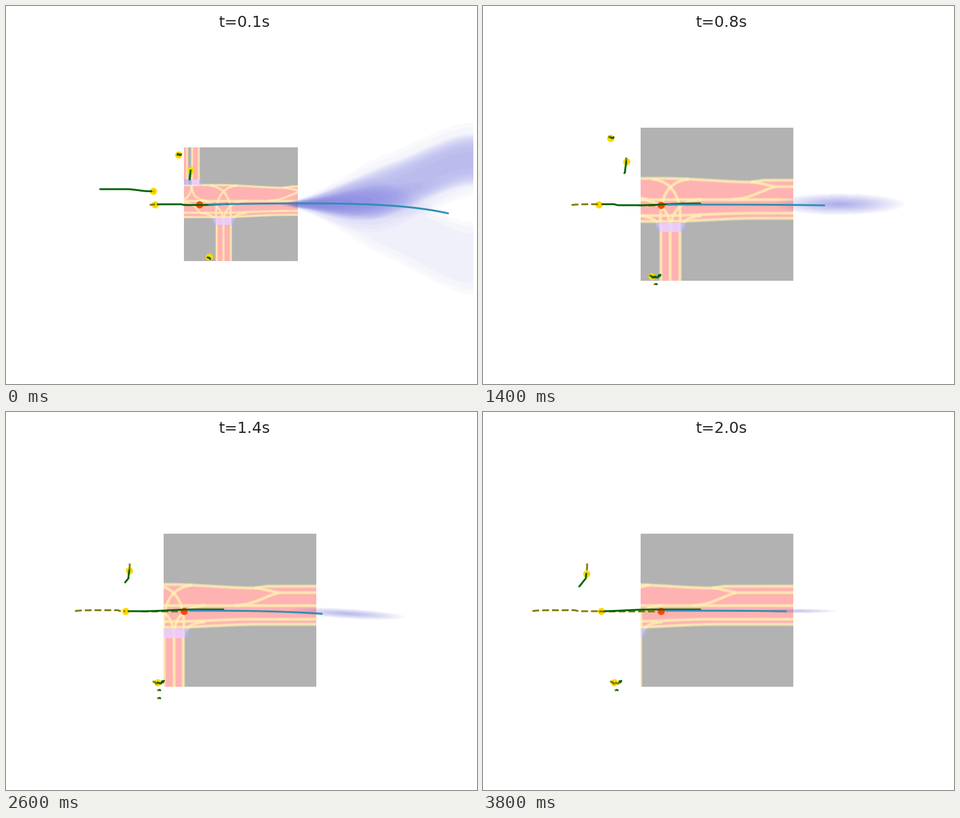
Animation of 765x615 px, one loop 4000 ms. Source, as a matplotlib script:

```python
import numpy as np
import matplotlib.pyplot as plt
from matplotlib.animation import FuncAnimation
from matplotlib.patches import Polygon, Rectangle

W, H, PT = 765, 615, 0.72
FRAMES, SPEED = 20, 5.3          # scroll in px per frame
CX, CY, EGO = 387, 322.5, (288.5, 323)
GREY, PINK, YELLOW = "#b2b2b2", "#ffb2b2", "#fff3b2"
BLUE, PALE = "#b4b2ff", "#ffd8ff"
STEP = 0.025                     # density contour step

plt.rcParams["font.family"] = "DejaVu Sans"
fig = plt.figure(figsize=(W / 100, H / 100), dpi=100, facecolor="white")
ax = fig.add_axes([0, 0, 1, 1])
title = fig.text(CX / W, 1 - 34 / H, "", fontsize=18, color="#262626",
                 ha="center", va="baseline")


def smooth(t):
    t = np.clip(t, 0, 1)
    return t * t * (3 - 2 * t)


def bezier(*p):
    t = np.linspace(0, 1, 30)[:, None]
    a, b, c, d = np.array(p, float)
    return (1-t)**3*a + 3*t*(1-t)**2*b + 3*t*t*(1-t)*c + t**3*d


def both_sides(*pts, x=341):
    return [bezier(*pts), bezier(*[(2 * x - px, py) for px, py in pts])]


def edge(y, dy, x1=750):
    """Line along the main road that eases by dy where the road narrows."""
    x = np.linspace(150, x1, 90)
    return np.column_stack((x, y + dy * smooth((x - 330) / 150)))


def block(x0, x1, y0, y1, flare=0):
    return [(x0 - flare, y0), (x1 + flare, y0), (x1, y1), (x0, y1)]


def scribble(seed, x, y, w, h, n):
    rng = np.random.default_rng(seed)
    t = np.linspace(-.5, .5, n)
    return np.column_stack((x + w * (t + rng.uniform(-.12, .12, n)),
                            y + h * rng.uniform(-.5, .5, n)))


# Road map
TOP, BOTTOM = edge(280, 6, 480), edge(350, -5)
BRANCH = [(472, 286), (492, 283), (750, 282.5)]
ROADS = [np.vstack((TOP, BRANCH[1:], BOTTOM[::-1])), block(325, 357, 345, 470),
         block(272, 287, 180, 285), block(240, 262, 180, 285)]
LANES = [TOP, BRANCH, BOTTOM, edge(314, 0), edge(340.5, -4),
         [(478, 286), (511, 293.5), (750, 293)],
         bezier((440, 314), (470, 314), (485, 301), (511, 293.5)),
         bezier((272, 280), (272, 300), (280, 312), (305, 314)),
         bezier((272, 282), (270, 300), (262, 312), (245, 314)),
         bezier((250, 316), (270, 318), (282, 328), (290, 341)),
         *both_sides((326, 365), (322, 330), (326, 286), (371, 281)),
         *both_sides((341, 365), (341, 335), (325, 316), (290, 314)),
         *both_sides((326, 365), (322, 350), (312, 342), (290, 341))]
LANES += [[(x, 363), (x, 470)] for x in (325.5, 341, 356.5)]
LANES += [[(x, 180), (x, 280)] for x in (262, 272.5, 286.5)]
CROSSINGS = [(BLUE, block(322, 361, 352, 367, 7)), (PALE, block(324, 358, 352, 367)),
             (BLUE, block(240, 293, 267, 280)), (PALE, block(272, 288, 267, 280))]

IDLER = scribble(4, 244.5, 213, 9, 4, 6)
CROWD = scribble(7, 316, 439, 20, 5, 12)


# Agent paths, in map coordinates
def follower(x):
    return (322 + 1.5 * np.exp((180 - x) / 8) + 1.6 * smooth((x - 249) / 7)
            - 2.8 * smooth((x - 290) / 85))


def oncoming(x):
    return 289 + 4.5 * smooth((x - 130) / 50)


def walker(y):
    return 269.3 - 2 * smooth((y - 250) / 20) - 0.8 * np.maximum(0, y - 270)


def trace(path, a, b, vertical=False):
    t = np.linspace(a, b, 80)
    return np.column_stack((path(t), t) if vertical else (t, path(t)))


# Predicted density
X0, X1, Y0, Y1 = 400, 759, 170, 490
GX, GY = np.meshgrid(np.arange(X0, X1), np.arange(Y0, Y1))


def mound(r, strength, power):
    return strength * np.clip(1 - np.abs(r)**power, 0, 1)


def ellipse(cx, cy, rx, ry, strength, power, slope=0):
    dx = GX - cx
    return mound(np.hypot(dx / rx, (GY - cy - slope * dx) / ry), strength, power)


def arm(bend, spread, strength):
    u = np.clip((GX - 440) / (X1 - 440), 0, 1)
    half = 3 + spread * smooth(1.8 * u)
    r = (GY - 322 - bend * smooth(u**1.7)) / half
    return mound(r, strength, 3) * smooth(8 * u)


def density(k, sway):
    fan, lobes, core = max(0, 1 - k / 2), max(0, 1 - abs(k - 2) / 2), min(1, k / 2)
    left = 480 - 40 * k / 19
    right = 690 + 180 * np.exp(-k / 2) - 110 * (k / 19)**3
    d = core * ellipse((left + right) / 2, 321 + 0.12 * k + 5 * sway, (right - left) / 2,
                       45 * np.exp(-k / 8), 0.5 - 0.01 * k, 1.2, 0.06 * sway)
    if fan:
        d += fan * (arm(-74, 62, .10) + arm(-72, 40, .26) + arm(88, 62, .10)
                    + arm(-15, 26, .15) * np.clip((X1 - GX) / 250, 0, 1))
    if lobes:
        d += lobes * (ellipse(615, 250, 148, 58, .12, 2) + ellipse(655, 330, 140, 45, .13, 2))
    rgba = np.empty(d.shape + (4,))
    rgba[..., :3] = np.array([60, 60, 208]) / 255
    rgba[..., 3] = np.floor(d / STEP) * STEP
    return rgba


def draw(k):
    s = 0.746 if k < 2 else 1
    shift = SPEED * k
    drift = -np.cos(np.pi * (k - 2) / 13)
    sway = np.exp(-((k - 13) / 1.5)**2)

    def view(pts, scroll=shift):
        p = np.array(pts, float)
        return np.column_stack((CX + s * (p[:, 0] - scroll - CX), CY + s * (p[:, 1] - CY)))

    def line(pts, color, z, scroll=shift, px=3, cap="round", **kw):
        return ax.plot(*view(pts, scroll).T, color=color, lw=px * PT, zorder=z,
                       solid_capstyle=cap, **kw)[0]

    def past(pts):
        line(pts, "olive", 5, ls="--")

    def future(pts):
        line(pts, "darkgreen", 6)

    def dot(x, y, color="gold", z=4, scroll=shift):
        ax.plot(*view([(x, y)], scroll).T, "o", ms=11.6 * PT, mew=0, color=color, zorder=z)

    ax.clear()
    ax.axis("off")

    # map window
    (x0, y0), (x1, y1) = view([(255.5, 197.8), (503.5, 446.3)], 0)
    box = Rectangle((x0, y0), x1 - x0, y1 - y0, fc=GREY, lw=0, zorder=1)
    ax.add_patch(box)
    parts = [ax.add_patch(Polygon(view(r), fc=PINK, lw=0, zorder=1.1)) for r in ROADS]
    for pts in LANES:
        for px, alpha in ((6, .3), (4.2, .45), (2.5, .5)):
            parts.append(line(pts, YELLOW, 1.2, px=px * s, cap="butt", alpha=alpha))
    for color, pts in CROSSINGS:
        parts.append(ax.add_patch(Polygon(view(pts), fc=color, alpha=.65, lw=0, zorder=1.3)))
    for part in parts:
        part.set_clip_path(box)

    ax.imshow(density(k, sway), extent=(X0 - .5, X1 - .5, Y1 - .5, Y0 - .5),
              aspect="auto", interpolation="nearest", zorder=2)

    # following car
    x = 189.3 + 4.2 * drift + 7 * np.exp(-1.5 * k) + shift
    past(trace(follower, 180.5, x))
    future(trace(follower, x + SPEED, 352.5 + shift))
    dot(x, follower(x))

    # oncoming car
    if k < 6:
        x = 188 - 3.6 * k
        past(trace(oncoming, 189.5, x))
        future(trace(oncoming, x - 3.6, 72.5 - 4.6 * k))
        dot(x, oncoming(x))

    # pedestrians
    y = 248 + 14.5 * (k / 19)**1.25
    past(trace(walker, 246, y, True))
    future(trace(walker, y, 268 + 15.5 * (k / 19)**1.5, True))
    dot(walker(y), y)

    if k < 12:
        now = min(k // 2, 3)
        past(IDLER[:now + 1])
        future(IDLER[now:])
        dot(244 + 1.5 * drift, 214)

    now = min(k // 2, 9)
    past(CROWD[:now + 1])
    future(CROWD[now:5 + 4 * k])
    dot(312 + 2.7 * drift, 440 - 4 * np.exp(-k / 3))
    for y, first, last in ((452, 5, 19), (465, 9, 13)):
        if first <= k <= last:
            past([(314, y + .5), (317, y)])
            future([(317.5, y - .5), (319, y + .3)])

    # ego car and its planned path
    if k:
        line([EGO, (EGO[0] + shift, EGO[1])], "olive", 4.5, ls="--")
    burst = np.exp(-k / 1.4)
    reach = 181.5 + 180 * np.exp(-k / 9) + 180 * burst
    u = np.linspace(0.04, 1, 60)
    lift = 3 * np.exp(-(k / 4)**2) * np.sin(np.pi * u)
    drop = 18 * burst * u**6 + (1 + 4 * sway) * u**3
    line(np.column_stack((EGO[0] + u * reach, 322.7 - lift + drop)), "#2e8fb0", 7, 0)
    dot(*EGO, "orangered", 5.5, 0)

    title.set_text(f"t={(k + 1) / 10:.1f}s")
    ax.set_xlim(-.5, W - .5)
    ax.set_ylim(H - .5, -.5)
    return []


anim = FuncAnimation(fig, draw, frames=FRAMES, interval=200, repeat=True,
                     repeat_delay=0, init_func=lambda: [])
plt.show()
```
